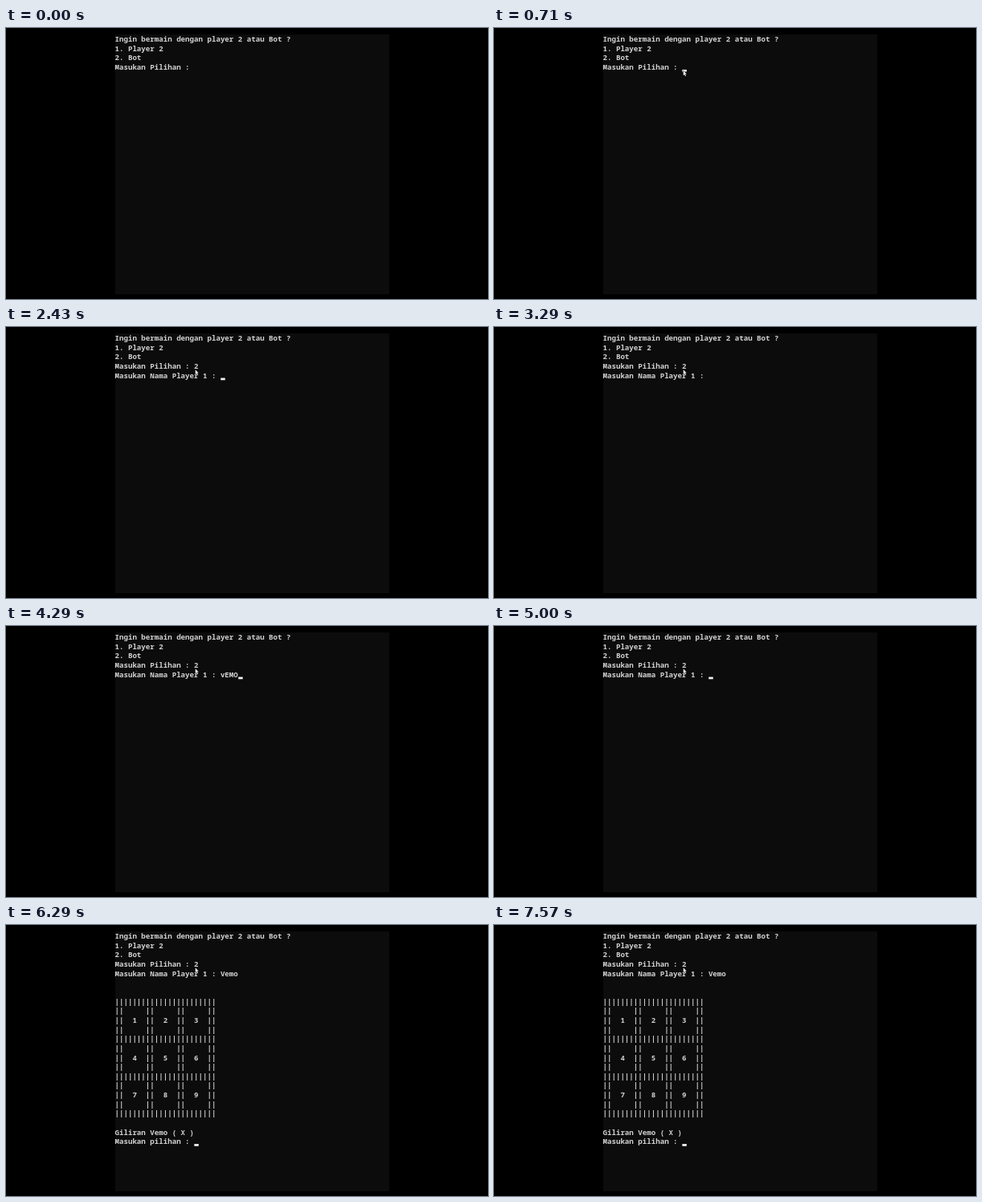
Recreate the animation shown at these times as an HTML page. Size 600 px wide and 338 px high, loop 8 s.

```html
<!DOCTYPE html>
<html lang="id">
<head>
<meta charset="utf-8">
<title>Terminal game</title>
<style>
  html, body { margin: 0; width: 100%; height: 100%; overflow: hidden; background: #000; }
  svg { display: block; width: 100%; height: 100%; }
  text {
    font: 600 9.15px "Noto Sans Mono", "DejaVu Sans Mono", monospace;
    font-variant-ligatures: none;
    white-space: pre;
    fill: #d0d0d0;
  }
  #cursor { fill: #f2f2f2; }
  #pointer { fill: #eee; stroke: #0c0c0c; stroke-width: .7; paint-order: stroke; }
</style>
</head>
<body>
<svg viewBox="0 0 600 338">
  <rect x="136" y="8" width="341" height="324" fill="#0c0c0c"/>
  <g id="lines"></g>
  <rect id="cursor" width="5.5" height="2.7"/>
  <path id="pointer" d="M0 0V6L1.4 4.8 2.4 7 3.3 6.6 2.4 4.4H4.1Z"/>
</svg>
<script>
const LOOP = 8000, LEFT = 135.5, TOP = 8, CELL = 5.49, ROW = 11.64;
const $ = id => document.getElementById(id);

const bar = "|".repeat(23);
const cells = marks => "||" + marks.map(m => `  ${m}  ||`).join("");
const board = [bar];
for (let n = 1; n < 10; n += 3) {
  const blank = cells([" ", " ", " "]);
  board.push(blank, cells([n, n + 1, n + 2]), blank, bar);
}

const intro = ["Ingin bermain dengan player 2 atau Bot ?", "1. Player 2", "2. Bot"];
const choice = "Masukan Pilihan : ";
const askName = "Masukan Nama Player 1 : ";
const menu = typed => [...intro, choice + typed];
const naming = typed => [...menu("2"), askName + typed];
const game = [...naming("Vemo"), "", "", ...board, "", "Giliran Vemo ( X )", "Masukan pilihan : "];

// Start time, screen lines, cursor visible
const timeline = [
  [0, menu(""), false],
  [710, menu(""), true],
  [1290, menu(""), false],
  [1570, menu("2"), true],
  [1710, menu("2"), false],
  [2290, menu("2"), true],
  [2430, naming(""), true],
  [3290, naming(""), false],
  [3710, naming("v"), true],
  [3860, naming("vE"), true],
  [4000, naming("vEM"), true],
  [4140, naming("vEMO"), false],
  [4290, naming("vEMO"), true],
  [4430, naming("vEMO"), false],
  [4570, naming("vEM"), true],
  [4710, naming("vE"), true],
  [4860, naming("v"), true],
  [5000, naming(""), true],
  [5430, naming("V"), false],
  [5710, naming("Ve"), true],
  [5860, naming("Vem"), true],
  [6000, naming("Vemo"), true],
  [6290, game, true],
  [7000, game, false],
  [7570, game, true]
];

const rows = game.map((_, i) => {
  const row = document.createElementNS("http://www.w3.org/2000/svg", "text");
  row.setAttribute("x", LEFT);
  row.setAttribute("y", TOP + 9.2 + i * ROW);
  $("lines").append(row);
  return row;
});

let shown;
function show(step) {
  const [, lines, cursorOn] = step;
  rows.forEach((row, i) => row.textContent = lines[i] || "");
  const last = lines.length - 1;
  $("cursor").setAttribute("x", LEFT + lines[last].length * CELL);
  $("cursor").setAttribute("y", TOP + last * ROW + 9);
  $("cursor").style.visibility = cursorOn ? "visible" : "hidden";
  shown = step;
}

function movePointer(t) {
  const drop = t < 290 ? 1.6 : t < 430 ? 0.8 : 0;
  $("pointer").setAttribute("transform", `translate(235.7 ${53.2 + drop})`);
  $("pointer").style.visibility = t < 140 ? "hidden" : "visible";
}

const start = performance.now();
function draw(now) {
  const t = Math.max(0, now - start) % LOOP;
  const step = timeline.findLast(([time]) => time <= t);
  if (step !== shown) show(step);
  movePointer(t);
  requestAnimationFrame(draw);
}
draw(start);
</script>
</body>
</html>
```
